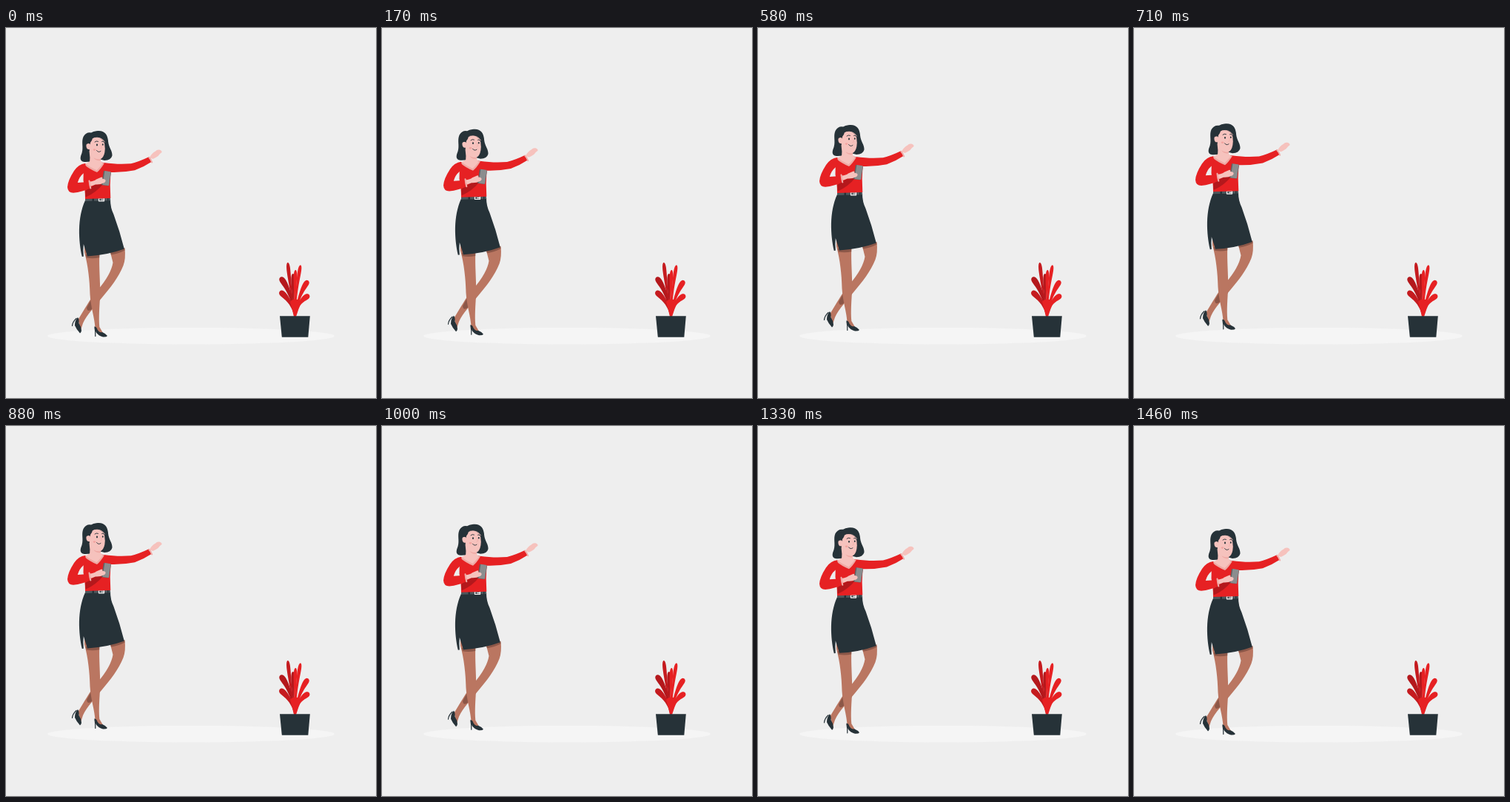
An HTML page with a canvas that plays this animation: 500x500 px, repeating every 1.5 s.

```html
<!DOCTYPE html>
<html lang="en">
<head>
<meta charset="utf-8">
<title>Woman and plant</title>
<style>
  html, body { margin: 0; width: 100%; height: 100%; overflow: hidden; background: #eee; }
  canvas { display: block; width: 500px; height: 500px; }
</style>
</head>
<body>
<canvas id="stage" width="500" height="500"></canvas>
<script>
const ctx = document.getElementById('stage').getContext('2d');

const LOOP = 1500, STEPS = 36, RISE = 10;
const C = {
  bg: '#eeeeee', floor: '#f5f5f5', ink: '#263238', red: '#e62123', darkRed: '#b4181c',
  skin: '#f6c2bd', skinShade: '#efaaa5', leg: '#ba7661', legShade: '#8c5748',
  phone: '#8b8d8e', phoneEdge: '#5f6365', belt: '#4d575c', white: '#fafafa'
};

function fill(color, d) {
  ctx.fillStyle = color;
  ctx.fill(new Path2D(d));
}

function line(color, width, d) {
  ctx.strokeStyle = color;
  ctx.lineWidth = width;
  ctx.lineCap = ctx.lineJoin = 'round';
  ctx.stroke(new Path2D(d));
}

function oval(color, x, y, rx, ry, turn = 0) {
  ctx.fillStyle = color;
  ctx.beginPath();
  ctx.ellipse(x, y, rx, ry, turn, 0, Math.PI * 2);
  ctx.fill();
}

// Club-shaped leaf: a bent spine, thin at the root and rounded at the tip.
function leaf(color, tipX, tipY, bendX, bendY, size) {
  const rootX = 390.5, rootY = 389, left = [], right = [], n = 36;
  for (let i = 0; i <= n; i++) {
    const s = 1 - (1 - i / n) ** 2, q = 1 - s;
    const x = q * q * rootX + 2 * q * s * bendX + s * s * tipX;
    const y = q * q * rootY + 2 * q * s * bendY + s * s * tipY;
    const dx = q * (bendX - rootX) + s * (tipX - bendX);
    const dy = q * (bendY - rootY) + s * (tipY - bendY);
    const len = Math.hypot(dx, dy) || 1;
    const w = size * (0.25 + 0.95 * s * s) * Math.sqrt(1 - s ** 9);
    left.push([x - dy / len * w, y + dx / len * w]);
    right.unshift([x + dy / len * w, y - dx / len * w]);
  }
  ctx.fillStyle = color;
  ctx.beginPath();
  for (const [x, y] of left.concat(right)) ctx.lineTo(x, y);
  ctx.fill();
}

function drawPlant() {
  leaf('#c51b1f', 380.8, 317, 384, 352, 3);
  leaf(C.red, 398, 320.5, 392, 352, 2.9);
  leaf(C.darkRed, 370.5, 337, 385, 354, 4.8);
  leaf('#c51b1f', 369.8, 356, 386, 368, 4.8);
  leaf(C.darkRed, 387.8, 332, 387, 360, 2.8);
  leaf(C.red, 391.3, 327, 390, 358, 2.7);
  leaf(C.red, 408.5, 341.5, 396, 357, 4.4);
  leaf(C.red, 410, 361, 394, 369, 4.6);
  fill(C.red, 'M384 370 Q391 362 399 371 Q395 380 392 390 H389 Q387 380 384 370Z');
  fill(C.ink, 'M370 389.200H410.800L408.300 417.800H372.800Z');
}

function drawLegs() {
  fill(C.leg, 'M141 303 L160.500 297 Q162 312 158.500 321 C152 337 141 351 130 364 C120 376 109 388 104 399 L101 408 L97.500 394 C105 382 114 365 124 354 Q142 333 144.500 317Z');
  fill(C.legShade, 'M141 303 L160 298 L160.500 300.500 Q152 305 142 306.500Z');
  fill(C.legShade, 'M115 367 Q119 361 127 354 L126.500 368 L116 380Q110 385 109 378Z');
  fill(C.leg, 'M106 296 L126.300 305 C125.500 324 127.500 343 127.200 360 C126.500 376 125 390 126.300 404 L131 412 L125 412.500 L120.500 406 C120 392 114.500 378 113.500 360 C113 340 111 322 106 303Z');
  fill(C.legShade, 'M107.500 306H126.200V310.300Q117 312 108.800 310.500Z');

  fill(C.ink, 'M97 391 Q99 393 98.500 399 Q102 404 102 409 Q101.500 412 100 412.500 Q95 407 93 402 Q93 395 97 391Z');
  line(C.ink, 1.2, 'M95 392.500 Q90 397 89.500 402.500');
  fill(C.ink, 'M119.300 403.500 Q122 403 123.500 407.500 Q126 412 130 411 Q135 413 137 416 Q136 417.800 131 417.500 Q125 416 121.500 411Z');
  line(C.ink, 1.2, 'M120 405 Q121 410 120.800 416.500');
}

function drawSkirt() {
  fill(C.ink, 'M107 233 L141 232 Q141 243 145.500 252 Q154 275 159.800 298.600 Q137 307 110 308.500 L104.800 292 Q104 300 104.800 308.800 L102.800 309 C98 288 96 257 107 233Z');
  fill(C.belt, 'M107 230 L140.800 229 L141.200 233.300 L107 234Z');
  fill(C.ink, 'M116.500 229.500 H119 V234 H116.500Z M137 229 H138.500 V233.500 H137Z');
  line(C.white, 1.2, 'M125.500 230 H132.500 V233.800 H125.500Z M129 232H132');
}

function drawTop() {
  fill(C.red, 'M105 184 Q120 180 132 182 C146 184 158 184 169 183.300 Q180 180.500 193.500 174 L196.800 180.800 Q186 188 174 192.300 Q158 195.500 141.500 195 Q140 212 141.300 230 L107 231 Q107 217 104.500 206Z');
  fill(C.darkRed, 'M107 220 L127 207 L131 211 Q122 222 109 228 L107.500 228Z');
  fill(C.skinShade, 'M105.500 184.500 Q112 181 120 180.500 L133 182.500 Q128 191 123 195 Q113 191 105.500 184.500Z');
  fill(C.skin, 'M112 176 L128 173 Q127 181 131 183 Q126 189 122.500 192.300 Q114 188.500 107.500 183.500 Q113 182 112 176Z');

  // Outstretched hand
  fill(C.skin, 'M194 175 Q197 169 202 166.500 Q204 164 207 164.500 Q211 165.500 210.500 168 Q208 169.500 205.500 173 Q202 175.500 198.500 177Z');
  line('#f0aeaa', 2, 'M193.300 174.800 Q196 177.500 197.200 181.500');
}

function drawPhoneArm() {
  fill(C.red, 'M107 183 Q98 184 92 193 Q83.500 206 83 215 Q83.500 222.800 91 222.800 Q103 221.500 114 216.500 L112.500 207 Q104 209 96.800 209 Q99 201 104 197 Q110 193 107 183Z');
  fill(C.phoneEdge, 'M132 193 L141 194.500 Q142 195 141.700 197 L139 212.500 Q138.500 213.500 137 213.300 L129 212Z');
  fill(C.phone, 'M133.500 193 L141.500 194.300 L139 213 L130.500 212Z');
  fill(C.skin, 'M113 207.500 Q119 207 122 204.500 L129 201.500 Q131 201.500 130 203.500 L133.500 204.500 Q136 206.500 133 209 Q127 212 121 211.500 L114.500 214Z');
  line('#f0aeaa', 2, 'M112.500 206.500 Q113 212 114.300 216.500');
}

function drawHead() {
  fill(C.ink, 'M122 139.300 C132 137.500 137.500 143 138 153 C139 162 144 166 143.500 172.500 Q142 178.500 133 179 L122 176 Q115 181.500 106 181 C98.500 180 100.500 174 102.500 169 C105 161 101.500 154 104.500 147 Q108 140.500 115 141.500 Q118 139.500 122 139.300Z');
  fill(C.skin, 'M112.500 166 L128 173 Q127.500 179 128 182 L113 183 Q114 175 112.500 166Z');
  fill(C.skinShade, 'M118 174.500 Q123 178.500 128 176.500 L127.500 179 Q121 180 118 174.500Z');
  fill(C.skin, 'M115 150 Q125 144 131 150 Q134 156 133.800 163 Q133.500 173 129 176.500 Q124 178.500 118 175 Q113 171 112.500 163Z');
  oval(C.skin, 111.500, 160, 3, 4, -0.2);
  fill(C.ink, 'M109.500 156.500 Q115.500 155.500 117 149 Q127 145.500 132.500 153.500 Q135 157 134.500 162 L138 153 Q135 142 125 140 Q112 140 108 151Z');
  line(C.skin, 0.8, 'M119 148.500 Q129 146.500 133.500 154');

  oval(C.ink, 123, 158, 1, 1.4);
  oval(C.ink, 130.800, 157.500, 0.9, 1.3);
  line(C.ink, 0.9, 'M120 154 Q122 152 124.500 153.300 M129.500 153.500 Q131 152.500 132.200 154');
  line(C.skinShade, 0.7, 'M128.300 158 Q130.500 162 128 163');
  line(C.ink, 0.9, 'M122.500 165.500 Q125 169 128 166.500');
  oval('#f2a5a1', 119.500, 164.500, 1.8, 1.3);
}

// Straight up and down; the first and last steps share the resting pose.
function lift(time) {
  const step = Math.floor((time % LOOP + 5) * STEPS / LOOP) % STEPS;
  return RISE * (1 - Math.abs(1 - 2 * step / (STEPS - 1)));
}

function draw(time) {
  ctx.fillStyle = C.bg;
  ctx.fillRect(0, 0, 500, 500);
  oval(C.floor, 250, 416.2, 193.9, 11.3);
  drawPlant();
  ctx.save();
  ctx.translate(0, -lift(time));
  drawLegs();
  drawSkirt();
  drawTop();
  drawPhoneArm();
  drawHead();
  ctx.restore();
}

const start = performance.now();
function tick() {
  draw(performance.now() - start);
  requestAnimationFrame(tick);
}
tick();
</script>
</body>
</html>
```
